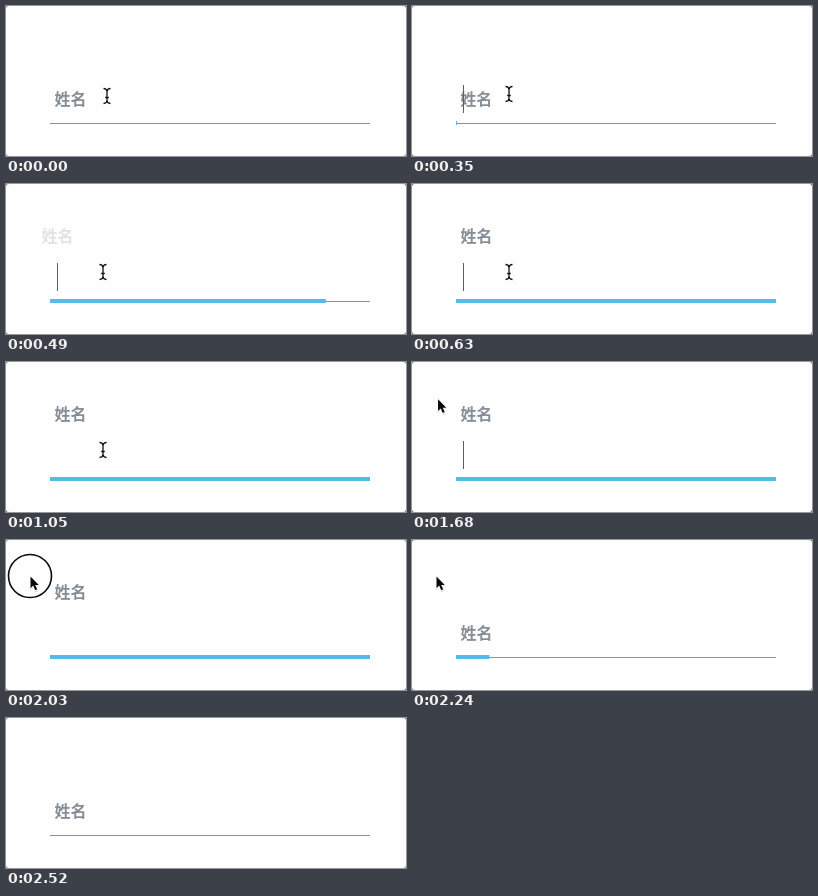
An HTML page for the animation above (2660 ms loop, 400x150 px).

```html
<!DOCTYPE html>
<html lang="zh-CN">
<head>
<meta charset="utf-8">
<title>Floating label input</title>
<style>
  html, body { margin: 0; width: 100%; height: 100%; overflow: hidden; background: #fefefe; }
  svg { display: block; width: 400px; height: 150px; }
  #label { font: 700 16px "Noto Sans CJK SC", "Noto Sans CJK JP", "Noto Sans CJK", sans-serif; fill: #858d95; }
  .corner { fill: #77787a; }
  .halo { stroke: #fff; stroke-linejoin: round; stroke-linecap: round; }
</style>
</head>
<body>
<svg viewBox="0 0 400 150">
  <rect width="400" height="150" fill="#fefefe"/>
  <path class="corner" d="M0 0H3Q0 0 0 3ZM400 0V3Q400 0 397 0ZM0 150V147Q0 150 3 150ZM400 150H397Q400 150 400 147Z"/>
  <rect x="44" y="117" width="320" height="1" fill="#89949a"/>
  <rect id="bar" x="44" y="115" width="0" height="4" fill="#50bee8"/>
  <text id="label">姓名</text>
  <rect id="caret" x="51" y="79" width="1" height="28" fill="#5c5f62"/>
  <circle id="ring" cx="24" cy="36" r="21.5" fill="none" stroke="#0a0a0a" stroke-width="1.6"/>
  <g id="beam" fill="none">
    <path class="halo" stroke-width="3" d="M-3.5 -7.5Q-.3 -7.5 0 -4.5Q.3 -7.5 3.5 -7.5M0 -4.5V4.5M-3.5 7.5Q-.3 7.5 0 4.5Q.3 7.5 3.5 7.5"/>
    <path stroke="#111" stroke-width="1.3" d="M-3.5 -7.5Q-.3 -7.5 0 -4.5Q.3 -7.5 3.5 -7.5M0 -4.5V4.5M-3.5 7.5Q-.3 7.5 0 4.5Q.3 7.5 3.5 7.5M-1.8 1.5H1.8"/>
  </g>
  <g id="arrow">
    <path d="M0 1V14.5L3.2 11.5L5.4 16.2L8 15L6 10.5H10Z" fill="#000" opacity=".16"/>
    <path class="halo" stroke-width="1.6" d="M.5 .5V12.2L3.2 9.6L5.2 14.2L7.2 13.3L5.2 8.9H8.8Z"/>
    <path d="M.5 .5V12.2L3.2 9.6L5.2 14.2L7.2 13.3L5.2 8.9H8.8Z" fill="#0a0a0a"/>
  </g>
</svg>
<script>
const LOOP = 2660, STEP = 70;
const FOCUS = 348, BLUR = 2086, SLIDE = 250;
const el = id => document.getElementById(id);
const bar = el('bar'), label = el('label'), caret = el('caret');
const ring = el('ring'), beam = el('beam'), arrow = el('arrow');

const progress = (t, from, to) => Math.min(1, Math.max(0, (t - from) / (to - from)));
const mix = (a, b, p) => a + (b - a) * p;
const within = (t, from, to) => t >= from && t < to;
const show = (node, on) => node.setAttribute('visibility', on ? 'visible' : 'hidden');

// CSS "ease": cubic-bezier(.25, .1, .25, 1)
function ease(x) {
  const bezier = (s, a, b) => 3 * (1 - s) ** 2 * s * a + 3 * (1 - s) * s * s * b + s ** 3;
  let lo = 0, hi = 1;
  for (let i = 0; i < 24; i++) {
    const mid = (lo + hi) / 2;
    if (bezier(mid, .25, .25) < x) lo = mid; else hi = mid;
  }
  return bezier(hi, .1, 1);
}

const linear = p => p;
const easeOut = p => 1 - (1 - p) ** 2;

// Pointer legs: start, end, from, to, easing
const legs = [
  [0, 210, [101, 90], [97, 88], easeOut],
  [1190, 1400, [97, 88], [38, 43], linear],
  [1400, 1820, [38, 43], [24, 36], easeOut],
  [2240, 2450, [24, 36], [24, 52], linear]
];

function pointer(t) {
  const [from, to, a, b, curve] = legs.filter(leg => t >= leg[0]).pop();
  const p = curve(progress(t, from, to));
  return [mix(a[0], b[0], p), mix(a[1], b[1], p)];
}

function drawLabel(t) {
  const fadeOut = 1 - progress(t, FOCUS, 472);
  const fadeIn = ease(progress(t, 460, 630));
  const low = t < 472 || t >= BLUR;
  const alpha = t >= BLUR ? 1 : low ? fadeOut : fadeIn;
  label.setAttribute('x', 48.5 - 17 * (1 - alpha));
  label.setAttribute('y', low ? 99 : 58);
  label.setAttribute('opacity', alpha);
}

function draw(t) {
  const grow = ease(progress(t, FOCUS, FOCUS + SLIDE));
  const shrink = ease(progress(t, BLUR, BLUR + SLIDE));
  bar.setAttribute('width', 320 * (grow - shrink));
  drawLabel(t);
  show(caret, within(t, 350, 840) || within(t, 1260, 1750));
  show(ring, within(t, 1960, 2100));

  const [x, y] = pointer(t);
  const typing = t < 1330;
  show(beam, typing);
  show(arrow, !typing && t < 2520);
  (typing ? beam : arrow).setAttribute('transform', `translate(${x} ${y})`);
}

const start = performance.now();
function tick() {
  const t = (performance.now() - start) % LOOP;
  draw(Math.floor(t / STEP) * STEP);
  requestAnimationFrame(tick);
}
tick();
</script>
</body>
</html>
```
